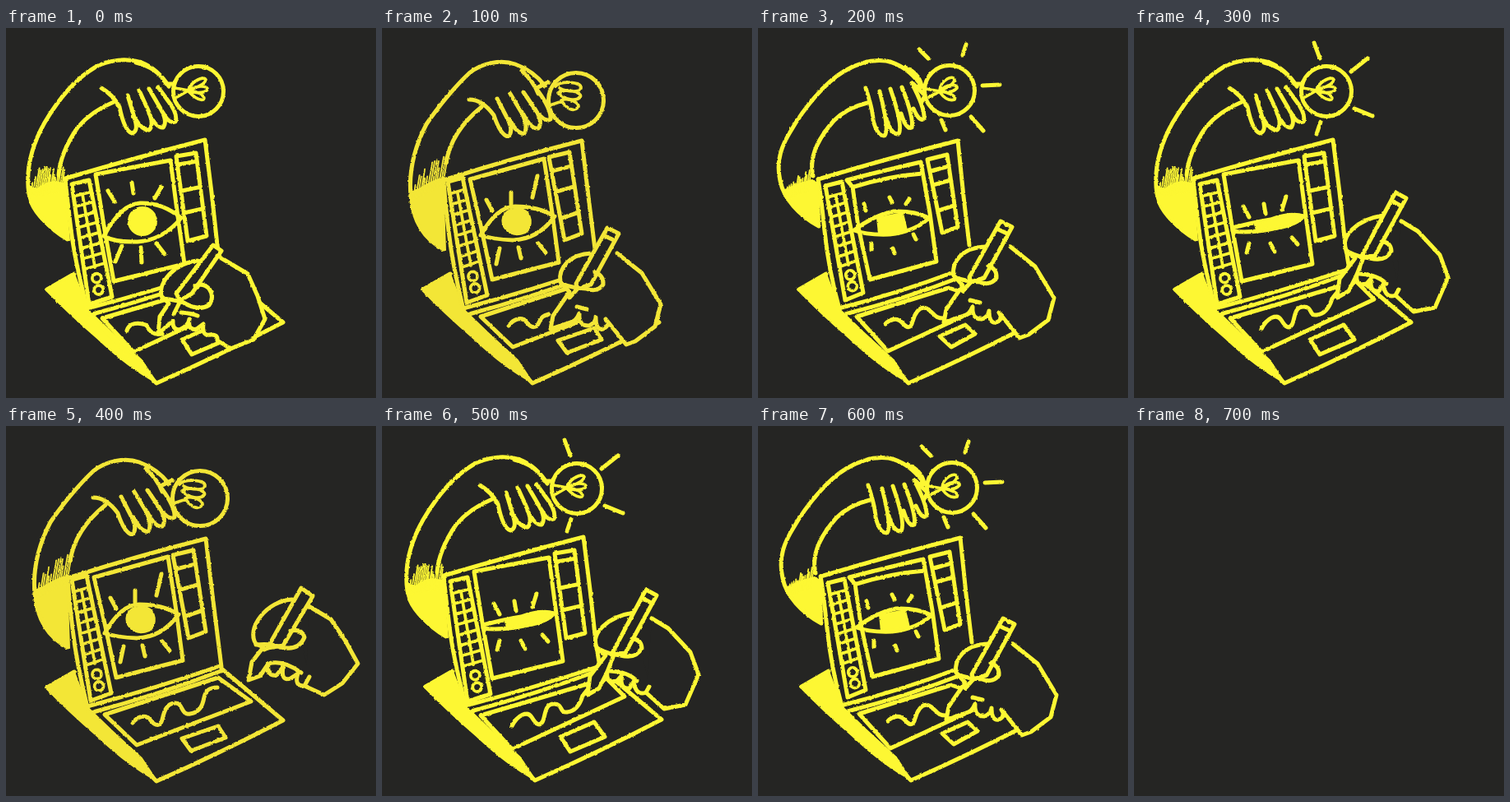
Recreate the animation shown at these times as an HTML page. Size 450 px wide and 450 px high, loop 0.8 s.

```html
<!DOCTYPE html>
<html lang="en">
<head>
<meta charset="utf-8">
<title>Idea at the laptop</title>
<style>
  html, body { margin: 0; width: 100%; height: 100%; overflow: hidden; background: #252523; }
  svg { display: block; width: 100%; height: 100%; }
  path { fill: none; stroke: currentColor; stroke-width: 5; stroke-linecap: round; stroke-linejoin: round; }
  path.solid { fill: currentColor; stroke-width: 2; }
  path.cover { fill: #252523; }
  path.thin { stroke-width: 3.7; }
  path.hatch { stroke-width: 1.8; }
</style>
</head>
<body>
<svg id="stage" viewBox="0 0 450 450"></svg>
<script>
const STEP = 100, STEPS = 8;
const stage = document.getElementById('stage');

const path = (d, cls = '') => `<path class="${cls}" d="${d}"/>`;
const mix = (a, b, t) => [a[0] + (b[0] - a[0]) * t, a[1] + (b[1] - a[1]) * t];
const line = (a, b) => `M${a}L${b}`;
const dot = (x, y, r) => `M${x - r},${y}a${r},${r} 0 1 1 ${2 * r},0a${r},${r} 0 1 1 ${-2 * r},0Z`;

function random(seed) {
  return () => (seed = (seed * 16807) % 2147483647) / 2147483647;
}

// Tool palette: two columns of cells and two round buttons at the bottom.
function palette([tl, tr, br, bl]) {
  const top = mix(tl, tr, .5), bottom = mix(bl, br, .5);
  let d = line(mix(top, bottom, .1), mix(top, bottom, .72));
  for (let i = 0; i < 8; i++) {
    const t = 0.1 + i * 0.087;
    d += line(mix(tl, bl, t), mix(tr, br, t));
  }
  for (const t of [.81, .91]) d += dot(...mix(top, bottom, t), 5.5);
  return path(d, 'thin') + path(`M${tl}L${tr}L${br}L${bl}Z`);
}

function panel([tl, tr, br, bl], cuts) {
  let d = `M${tl}L${tr}L${br}L${bl}Z`;
  for (const t of cuts) d += line(mix(tl, bl, t), mix(tr, br, t));
  return path(d);
}

// Loose chalk strokes that fray the upper edge of the sleeve shadow.
function hatch([a, b], n, len, seed) {
  const rnd = random(seed);
  let d = '';
  for (let i = 0; i < n; i++) {
    const [x, y] = mix(a, b, i / (n - 1));
    const h = len * (0.25 + rnd() * 0.75);
    d += line([x - 1, y + 12], [x + h * 0.22, y - h]);
  }
  return path(d, 'hatch');
}

const BASES = {
  a: {
    arm: 'M75,257C52,244 33,222 28,202C23,170 33,140 47,115C63,88 84,62 108,48C124,39 145,36 165,42Q185,50 198,71M158,42Q184,48 195,68L207,68' +
      'M64,179Q66,152 87,121Q104,101 131,90',
    fingers: 'M116,73Q130,81 138,96Q144,125 153,128Q161,126 157,112L148,82M157,110Q166,125 174,124Q181,118 172,98L162,76' +
      'M174,104Q183,122 191,121Q197,114 188,98L174,74M191,103Q198,117 206,114Q209,107 201,94L185,72',
    shadow: 'M27,192L38,196L46,190L58,187L70,189L73,215L77,258Q40,238 29,212Z',
    fray: [[31, 194], [68, 187], 17, 23, 41],
    bulb: [234, 77, 30.5],
    wire: 'M206,73L222,76L208,84M222,75C226,64 241,58 243,63Q242,69 222,76C232,69 246,70 245,75Q240,81 222,77C232,76 244,83 240,87Q233,89 222,77',
    lid: 'M99,342Q84,285 79,245T72,183Q160,157 242,136L250,200L257,264L262,294',
    hinge: 'M99,341Q180,320 262,293M105,348Q185,327 264,297',
    tools: [[80, 190], [101, 185], [129, 327], [101, 336]],
    window: 'M109,178Q155,169 200,161L208,222L217,287L131,308L119,240Z',
    side: [[[207, 156], [231, 152], [244, 253], [221, 259]], [.1, .41, .67]],
    pad: 'M117,353L270,308L292,330L155,394Z',
    key: 'M214,379L255,361L268,379L226,397Z'
  },
  b: {
    arm: 'M74,241C50,228 31,207 27,186C21,160 30,141 40,125C56,97 82,66 104,53C122,42 140,38 156,40Q180,45 198,69M179,48Q195,54 199,70' +
      'M67,180C62,160 70,138 92,113Q108,97 133,91M189,68L203,82M196,70L209,76M199,90L203,82',
    fingers: 'M131,73Q140,101 140,112Q145,132 154,131Q160,125 148,77M156,110Q162,130 171,129Q177,120 161,74' +
      'M174,104Q180,124 187,121Q190,110 175,72M189,98Q197,116 202,110Q203,97 187,67',
    shadow: 'M31,198L42,193L55,188L66,185L74,190L75,242Q49,227 31,203Z',
    fray: [[35, 197], [62, 186], 13, 14, 77],
    bulb: [233, 76, 30.5],
    wire: 'M204,74L221,77L208,84M221,76C222,63 238,56 239,63Q238,69 221,77C230,67 243,68 242,73Q236,80 221,77C230,78 242,82 239,87Q230,90 221,78',
    lid: 'M99,342Q86,295 81,247T73,184Q160,158 243,137L250,205L257,264',
    hinge: 'M98,341Q170,323 246,294M106,348Q180,329 246,303',
    tools: [[82, 192], [102, 187], [128, 322], [106, 331]],
    window: 'M108,185Q150,174 198,163L209,225L217,284L136,306L122,242L115,193ZM117,193Q160,180 200,177',
    side: [[[206, 160], [230, 154], [243, 242], [224, 249]], [.16, .35, .7]],
    pad: 'M120,351L232,316L285,334L158,393Z',
    key: 'M221,375L252,361L264,372L235,388Z'
  },
  c: {
    arm: 'M75,269C51,257 38,235 35,204C32,172 40,144 54,117C70,93 92,68 106,55C122,42 145,38 162,44Q184,52 198,70M170,52Q185,66 190,80M190,72L202,66' +
      'M78,164Q84,126 121,96',
    fingers: 'M106,87Q122,87 136,106Q144,130 153,132Q160,127 154,113L140,86M155,111Q165,130 173,128Q178,120 171,105L156,80' +
      'M172,105Q181,123 190,122Q196,114 187,100L172,78M189,103Q199,115 205,111Q206,99 190,77',
    shadow: 'M35,198L43,197L57,189L74,182L77,270Q43,252 37,218Z',
    fray: [[39, 198], [75, 179], 14, 28, 19],
    bulb: [236, 88, 33.5],
    wire: 'M211,71C217,64 241,65 242,72S225,78 216,73M214,79C224,72 245,79 241,84S222,88 214,79M218,88C227,84 243,92 238,97S225,99 218,88M204,94L219,89',
    lid: 'M99,342Q86,290 81,247T75,185Q160,158 243,137L251,205L262,293',
    hinge: 'M99,341Q182,319 260,292M106,348Q184,327 264,297',
    tools: [[80, 187], [98, 182], [128, 325], [103, 334]],
    window: 'M107,184Q150,172 197,159L207,225L215,285L134,306L120,240Z',
    side: [[[203, 157], [228, 151], [243, 250], [222, 258]], [.17, .42, .74]],
    pad: 'M120,351L258,306L298,335L159,388Z',
    key: 'M214,380L258,365L267,379L225,395Z'
  }
};

const EYES = {
  open: {
    lids: 'M119,253Q140,214 163,213Q190,212 213,231Q191,258 160,260Q133,261 119,253Z',
    pupil: dot(166, 235, 17),
    lashes: 'M124,198L132,211M153,188L155,201M189,193L181,207M141,265L133,284M164,267L165,285M183,262L193,275'
  },
  wide: {
    lids: 'M120,252Q140,217 162,217Q190,217 210,229Q190,257 159,258Q135,257 120,252Z',
    pupil: 'M147,240C143,222 159,219 168,220C184,222 184,244 174,249Q156,256 147,240Z',
    lashes: 'M127,209L134,222M157,200L157,214M189,180L183,206M143,268L139,287M166,267L169,280M190,262L199,273'
  },
  half: {
    lids: 'M117,246Q140,228 165,223Q190,222 208,231Q190,248 160,251Q132,252 117,246Z',
    pupil: 'M145,231L176,225L181,246L147,250Z',
    lashes: 'M129,214L131,222M160,206L163,212M184,208L180,214M138,262L138,270M164,268L166,274M189,251L192,257'
  },
  shut: {
    lids: 'M120,243Q147,236 166,233Q192,224 206,229Q198,239 175,243Q142,250 120,247Z',
    pupil: 'M147,239Q173,230 203,227Q208,232 190,238L149,246Z',
    lashes: 'M133,217L140,230M158,214L160,226M185,205L180,221M140,262L137,273M166,262L171,272M192,255L199,263'
  }
};

// Each hand: silhouette, pen barrel, finger creases.
const HANDS = {
  low: [
    'M233,283C204,286 185,310 189,326L198,335L187,351L185,372L203,356Q202,367 211,367Q222,362 223,354Q221,369 232,366L240,360Q238,375 248,373Q258,372 257,380L273,390L301,379L315,354L306,326L294,299L262,280',
    'M252,264L262,271L226,323L212,331L207,323Z',
    'M190,329Q208,331 216,334Q234,345 247,337Q254,327 247,317Q239,309 230,314M204,348L211,334M213,346Q226,347 233,350'
  ],
  mid: [
    'M276,266C249,267 235,284 238,301L249,313L229,342L226,358L250,350Q257,349 261,339Q260,355 273,354Q281,350 281,344Q281,360 290,358Q299,354 293,346L318,377L329,373L353,355L360,328L337,290L307,266',
    'M295,235L309,242L275,304L259,309L257,303ZM290,244L303,250',
    'M240,303Q251,308 269,309Q283,314 290,304Q291,293 280,289M249,320L258,310M258,331L270,334'
  ],
  high: [
    'M303,228C271,233 251,253 258,270L269,280L250,305L247,328L261,320L271,300Q269,315 283,311L289,304Q285,321 298,320L303,312Q306,330 318,325L322,318M319,326L340,345L366,340L382,303L372,276L345,247L325,235',
    'M318,200L331,207L293,277L276,279ZM313,210L326,217',
    'M260,272Q274,279 287,280Q306,285 313,271Q312,260 301,260M271,300L278,282M275,299Q296,300 307,311'
  ],
  away: [
    'M348,211C318,212 291,246 304,265L313,269L299,287L295,309L309,304L319,289Q317,305 329,303L337,293Q334,311 346,307L355,301Q350,317 363,316L369,305M365,317L387,327L409,313L428,289L412,260L395,235L368,219',
    'M359,197L373,207L337,267L318,270Z',
    'M304,266Q323,264 334,269Q356,274 363,257Q360,246 346,249M314,272L325,267M319,289Q337,284 359,300'
  ]
};

const SQUIGGLES = {
  start: 'M147,368C150,358 161,358 170,361C175,369 179,374 190,372',
  some: 'M154,362C160,354 170,350 176,358S188,365 191,358S196,350 203,348',
  more: 'M155,360C161,353 170,352 176,359S186,365 188,357S196,337 205,341S213,354 228,353',
  most: 'M155,366C162,352 174,347 179,355S188,367 192,361S194,339 206,339S212,350 222,349S238,339 241,329L249,319',
  full: 'M154,361C160,353 170,350 176,358S188,365 190,357S194,338 205,337S212,352 224,350S239,340 241,330S249,318 257,318'
};

const RAYS = {
  b: 'M196,26L207,37M253,20L249,33M273,70L294,69M259,108L274,125M223,112L228,124',
  a: 'M219,18L226,37M284,37L264,53M268,98L290,107M227,114L222,129'
};

const BOLD = '#fdf733', PALE = '#f3e636';

// Picture for each step; the last one is empty.
const POSES = [
  { base: 'a', eye: 'open', hand: 'low', ink: 'start' },
  { base: 'c', eye: 'wide', hand: 'mid', ink: 'some', reach: [-21, 8], tint: PALE },
  { base: 'b', eye: 'half', hand: 'mid', ink: 'more', lit: true },
  { base: 'a', eye: 'shut', hand: 'high', ink: 'most', lit: true },
  { base: 'c', eye: 'wide', hand: 'away', ink: 'full', tint: PALE },
  { base: 'a', eye: 'shut', hand: 'high', ink: 'most', lit: true, shift: [3, -1] },
  { base: 'b', eye: 'half', hand: 'mid', ink: 'more', lit: true, shift: [3, -1] }
];

function drawLaptop(b, eye, ink) {
  return path('M48,318L83,299L99,342L128,370L165,404L183,431Q150,414 112,378Q75,346 48,318Z', 'solid') +
    path('M50,318L83,299M100,347L183,432Q260,398 337,358L262,295') +
    path(b.lid) + path(b.hinge) + palette(b.tools) + path(b.window) + panel(...b.side) +
    path(eye.lids) + path(eye.pupil, 'solid') + path(eye.lashes) +
    path(b.pad) + path(b.key) + path(ink);
}

function drawArm(b) {
  return path(b.shadow, 'solid') + hatch(b.fray.slice(0, 2), ...b.fray.slice(2)) +
    path(b.arm) + path(b.fingers) + path(dot(...b.bulb), 'cover') + path(b.wire, 'thin');
}

function drawHand([shape, pen, creases], [x, y]) {
  return `<g transform="translate(${x} ${y})">` +
    path(shape, 'cover') + path(pen, 'cover') + path(creases) + '</g>';
}

function drawPose({ base, eye, hand, ink, lit, reach = [0, 0], shift = [0, 0], tint = BOLD }) {
  const b = BASES[base];
  return `<g display="none" transform="translate(${shift})"><g color="${tint}" filter="url(#chalk-${base})">` +
    drawArm(b) + (lit ? path(RAYS[base]) : '') +
    drawLaptop(b, EYES[eye], SQUIGGLES[ink]) + drawHand(HANDS[hand], reach) + '</g></g>';
}

const chalk = (id, seed) =>
  `<filter id="chalk-${id}" filterUnits="userSpaceOnUse" x="0" y="0" width="450" height="450" color-interpolation-filters="sRGB">
    <feTurbulence type="fractalNoise" baseFrequency=".27" numOctaves="2" seed="${seed}"/>
    <feDisplacementMap in="SourceGraphic" scale="2.4" xChannelSelector="R" yChannelSelector="G"/>
    <feGaussianBlur stdDeviation=".4"/>
  </filter>`;

stage.innerHTML = '<defs>' + chalk('a', 3) + chalk('b', 8) + chalk('c', 14) + '</defs>' +
  '<rect width="450" height="450" fill="#252523"/>' + POSES.map(drawPose).join('');
const pictures = [...stage.querySelectorAll(':scope > g')];

function render(ms) {
  const step = Math.floor(ms / STEP) % STEPS;
  pictures.forEach((g, i) => g.setAttribute('display', i === step ? 'inline' : 'none'));
}

const begin = performance.now();
function tick() {
  render(performance.now() - begin);
  requestAnimationFrame(tick);
}
render(0);
requestAnimationFrame(tick);
</script>
</body>
</html>
```
